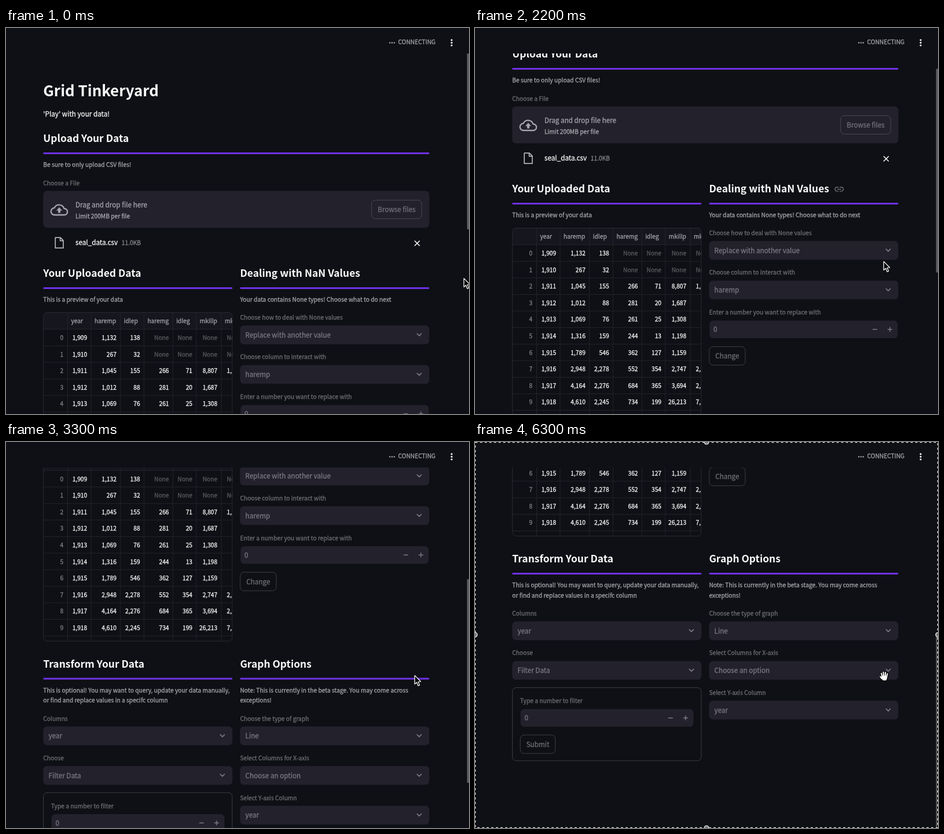
Recreate the animation shown at these times as an HTML page with a canvas. Size 800 by 667 pixels, loop 6.5 s.

```html
<!DOCTYPE html>
<html lang="en">
<head>
<meta charset="utf-8">
<title>Grid Tinkeryard</title>
<style>
html, body { margin: 0; width: 100%; height: 100%; overflow: hidden; background: #0e1015; }
canvas { display: block; width: 800px; height: 667px; }
</style>
</head>
<body>
<canvas id="stage"></canvas>
<script>
const W = 800, H = 667, LOOP = 6500, HEADER = 44;
const canvas = document.getElementById('stage');
const ctx = canvas.getContext('2d');
const dpr = window.devicePixelRatio || 1;
canvas.width = W * dpr;
canvas.height = H * dpr;

const FAMILY = '"Noto Sans CJK JP", "Noto Sans CJK SC", "Noto Sans CJK KR", "Noto Sans", sans-serif';
const SMALL = '10.24px ' + FAMILY;
const BODY = '11.7px ' + FAMILY;
const HEAD = 'bold 17.4px ' + FAMILY;
const TITLE = 'bold 25.9px ' + FAMILY;

const C = {
  bg: '#0e1015', box: '#23212c', accent: '#7031e6', white: '#fafafa',
  caption: '#a6a7aa', label: '#6e6f74', field: '#7b7983', soft: '#a5a4af',
  grid: '#23242b', edge: '#3d3e44', gridHead: '#16171e', none: '#5a5b61'
};
const LEFT = 64.3, MID = 404.4, COL = 327, FULL = 667.2, RADIUS = 6.5;

const COLUMNS = ['year', 'haremp', 'idlep', 'haremg', 'idleg', 'mkillp', 'mkillb'];
const EDGES = [106.5, 147, 197.7, 238.4, 288.3, 328.8, 372];
const ROWS = [
  '1,909 1,132 138 None None None None', '1,910 267 32 None None None None',
  '1,911 1,045 155 266 71 8,807 1,', '1,912 1,012 88 281 20 1,687',
  '1,913 1,069 76 261 25 1,308', '1,914 1,316 159 244 13 1,198',
  '1,915 1,789 546 362 127 1,159', '1,916 2,948 2,278 552 354 2,747 2,',
  '1,917 4,164 2,276 684 365 3,694 2,', '1,918 4,610 2,245 734 199 26,213 7,'
].map(row => row.split(' '));

// [time, scroll offset]
const SCROLL = [
  [1300, 0], [1400, 5], [1600, 54], [1800, 104], [2000, 118], [2100, 122],
  [2300, 170], [2500, 229], [2700, 252], [2800, 260], [3000, 362],
  [3200, 457], [3300, 471.5], [3500, 471.5], [3600, 482], [3800, 614],
  [3900, 655.3], [4000, 658], [4200, 655.5], [4500, 653]
];

function sample(keys, t) {
  if (t <= keys[0][0]) return keys[0][1];
  for (let i = 1; i < keys.length; i++) {
    const [t0, v0] = keys[i - 1], [t1, v1] = keys[i];
    if (t <= t1) return v0 + (v1 - v0) * (t - t0) / (t1 - t0);
  }
  return keys[keys.length - 1][1];
}

// A hairline around the regular weight gives the slightly heavy screen rendering.
function text(str, x, y, font, color, align = 'left') {
  ctx.font = font;
  ctx.fillStyle = ctx.strokeStyle = color;
  ctx.textAlign = align;
  ctx.fillText(str, x, y);
  if (font === SMALL || font === BODY) {
    ctx.lineWidth = 0.28;
    ctx.strokeText(str, x, y);
  }
}

function round(x, y, w, h, r = RADIUS) {
  ctx.beginPath();
  ctx.roundRect(x, y, w, h, r);
}

function fillBox(x, y, w, h, color, r) {
  round(x, y, w, h, r);
  ctx.fillStyle = color;
  ctx.fill();
}

function outline(x, y, w, h, color) {
  round(x, y, w, h);
  ctx.strokeStyle = color;
  ctx.lineWidth = 1;
  ctx.stroke();
}

function stroke(path, color, width) {
  ctx.strokeStyle = color;
  ctx.lineWidth = width;
  ctx.stroke(new Path2D(path));
}

function fill(path, color) {
  ctx.fillStyle = color;
  ctx.fill(new Path2D(path));
}

function dot(x, y, r, color) {
  ctx.beginPath();
  ctx.arc(x, y, r, 0, Math.PI * 2);
  ctx.fillStyle = color;
  ctx.fill();
}

function at(x, y, draw) {
  ctx.save();
  ctx.translate(x, y);
  draw();
  ctx.restore();
}

function heading(str, x, y, width) {
  text(str, x, y, HEAD, C.white);
  fillBox(x, y + 18, width, 3, C.accent, 1.4);
}

const caption = (str, x, y) => text(str, x, y, SMALL, C.caption);
const label = (str, x, y) => text(str, x, y, SMALL, C.label);

function select(name, value, x, y) {
  label(name, x, y - 10);
  fillBox(x, y, COL, 32.4, C.box);
  text(value, x + 9.2, y + 20.6, BODY, C.field);
  at(x + 309.6, y + 16, () => stroke('M-3.6-1.8L0 1.8L3.6-1.8', C.field, 1.7));
}

function numberInput(name, x, y, w) {
  label(name, x, y - 10.5);
  fillBox(x + 0.8, y, w - 0.8, 30.5, C.box);
  text('0', x + 7.6, y + 19.8, BODY, C.field);
  at(x + w - 39.5, y + 15.2, () => stroke('M-3.4 0H3.4', C.field, 1.5));
  at(x + w - 13.5, y + 15.2, () => stroke('M-3.5 0H3.5M0-3.5V3.5', C.field, 1.5));
}

function button(str, x, y, w, color, border) {
  outline(x, y, w, 32, border);
  text(str, x + w / 2, y + 20.8, BODY, color, 'center');
}

function linkIcon(x, y) {
  at(x, y, () => stroke('M-1.3-3.4H-3.8A3.4 3.4 0 0 0-3.8 3.4H-1.3' +
    'M1.3-3.4H3.8A3.4 3.4 0 0 1 3.8 3.4H1.3M-3 0H3', '#7f8085', 1.2));
}

function uploader() {
  fillBox(LEFT, 281.6, FULL, 63.6, C.box);
  at(92, 314, () => {
    stroke('M-8 9A6 6 0 0 1-8.4-3.2A9 9 0 0 1 8.3-2A5.4 5.4 0 0 1 9 9Z', C.soft, 2.3);
    fill('M0-4.2L5 1.4H2V5.4H-2V1.4H-5Z', C.soft);
  });
  text('Drag and drop file here', 120, 309.8, BODY, C.soft);
  text('Limit 200MB per file', 120, 329.2, SMALL, '#adacb4');
  button('Browse files', 631.7, 297.5, 86.6, '#74727c', '#494751');

  at(92, 371.2, () => stroke('M-6.8-9H2L7-4V9H-6.8ZM1.6-8.6V-3.6H6.6', '#b2b3b7', 1.7));
  text('seal_data.csv', 120, 374.8, BODY, C.white);
  text('11.0KB', 199.8, 375, SMALL, '#8a8b90');
  at(710.4, 372, () => stroke('M-4-4L4 4M4-4L-4 4', C.white, 1.6));
}

function table() {
  const top = 491.3, bottom = 816, first = 520.6, step = 28.6;
  ctx.save();
  round(LEFT, top, COL, bottom - top);
  ctx.clip();
  ctx.fillStyle = C.gridHead;
  ctx.fillRect(LEFT, top, COL, first - top);

  ctx.fillStyle = C.grid;
  EDGES.forEach(x => ctx.fillRect(x - 0.5, top, 1, bottom - top));
  for (let i = 0; i <= ROWS.length; i++) ctx.fillRect(LEFT, first + i * step - 0.5, COL, 1);

  COLUMNS.forEach((name, i) => text(name, EDGES[i] + 6, 510.2, SMALL, '#a2a3a8'));
  ROWS.forEach((row, r) => {
    const y = first + r * step + 18.4;
    text(r, 99.2, y, SMALL, '#818288', 'right');
    row.forEach((value, i) => {
      const color = value === 'None' ? C.none : C.white;
      if (i === 6) text(value, 381.6, y, SMALL, color);
      else text(value, EDGES[i + 1] - 6.8, y, SMALL, color, 'right');
    });
  });
  ctx.restore();
  outline(LEFT + 0.4, top + 0.4, COL - 0.8, bottom - top - 0.8, '#292a31');
}

function page(t) {
  text('Grid Tinkeryard', LEFT, 117.6, TITLE, C.white);
  text("'Play' with your data!", LEFT, 153, BODY, C.white);
  heading('Upload Your Data', LEFT, 197, FULL);
  caption('Be sure to only upload CSV files!', LEFT, 240.4);
  label('Choose a File', LEFT, 271.8);
  uploader();

  heading('Your Uploaded Data', LEFT, 430, COL);
  caption('This is a preview of your data', LEFT, 472.6);
  table();

  heading('Dealing with NaN Values', MID, 430, COL);
  if (t >= 400 && t < 2800) linkIcon(629.2, 424.6);
  caption('Your data contains None types! Choose what to do next', MID, 472.6);
  select('Choose how to deal with None values', 'Replace with another value', MID, 514);
  select('Choose column to interact with', 'haremp', MID, 582.4);
  numberInput('Enter a number you want to replace with', MID, 651.6, 326);
  button('Change', MID + 0.3, 696.6, 62.3, C.label, C.edge);

  heading('Transform Your Data', LEFT, 861, COL);
  caption('This is optional! You may want to query, update your data manually,', LEFT, 904);
  caption('or find and replace values in a specifc column', LEFT, 921.6);
  select('Columns', 'year', LEFT, 963);
  select('Choose', 'Filter Data', LEFT, 1031.4);
  outline(LEFT + 0.4, 1077.4, COL - 0.8, 126.4, C.edge);
  numberInput('Type a number to filter', 77.8, 1114.6, 299.6);
  button('Submit', 78.2, 1159.2, 60.6, C.label, C.edge);

  heading('Graph Options', MID, 861, COL);
  if (t >= 3600 && t < 4700) linkIcon(544, 856.2);
  caption('Note: This is currently in the beta stage. You may come across', MID, 904);
  caption('exceptions!', MID, 921.6);
  select('Choose the type of graph', 'Line', MID, 963);
  select('Select Columns for X-axis', 'Choose an option', MID, 1031.4);
  select('Select Y-axis Column', 'year', MID, 1100);
}

function toolbar() {
  [663.2, 667, 670.8].forEach(x => dot(x, 25.4, 1.25, '#a3a4a9'));
  text('CONNECTING', 677.6, 28.4, SMALL, '#a3a4a9');
  [20.8, 25.4, 30].forEach(y => dot(770, y, 1.6, C.white));
}

function arrow(x, y, scale = 1) {
  const shape = 'M.6.6V15.6L4 12.5L6.5 18.4L9 17.3L6.5 11.6L11 11.2Z';
  at(x, y, () => {
    ctx.scale(scale, scale);
    fill(shape, '#000');
    stroke(shape, '#fff', 1.25);
  });
}

function blocked() {
  arrow(705, 401.5, 0.95);
  at(715.6, 426.8, () => {
    const sign = 'M8 0A8 8 0 1 1-8 0A8 8 0 1 1 8 0M-5.6-5.6L5.6 5.6';
    dot(0, 0, 8, C.bg);
    stroke(sign, '#000', 4);
    stroke(sign, '#fff', 2.3);
  });
}

function hand() {
  const fingers = 'M-3.6 0L-4.8-4.6M-1-1L-1.4-6.6M1.8-1L2.2-6.2M4.3 1L5.4-3.8M-4 4.6L-6.8 1';
  const palm = 'M-4.6-.6H5.2V3L3.6 7.6H-2.2L-5 3.4Z';
  at(707, 404.4, () => {
    stroke(fingers, '#000', 4);
    stroke(palm, '#000', 2);
    stroke(fingers, '#fff', 2.1);
    fill(palm, '#fff');
  });
}

function selection() {
  ctx.save();
  ctx.lineCap = 'butt';
  ctx.lineWidth = 1.2;
  ctx.strokeStyle = '#000';
  ctx.strokeRect(0.6, 0.6, W - 1.2, H - 1.2);
  ctx.setLineDash([4, 4]);
  ctx.strokeStyle = '#e8e8e8';
  ctx.strokeRect(0.6, 0.6, W - 1.2, H - 1.2);
  ctx.restore();
  [[400, 0], [0, 333], [800, 333], [400, 667]].forEach(([x, y]) => {
    dot(x, y, 4.6, '#e6e6e6');
    dot(x, y, 3.2, '#77787b');
  });
}

function render(t) {
  ctx.setTransform(dpr, 0, 0, dpr, 0, 0);
  ctx.lineCap = ctx.lineJoin = 'round';
  ctx.fillStyle = C.bg;
  ctx.fillRect(0, 0, W, H);

  const scroll = sample(SCROLL, t);
  ctx.save();
  ctx.beginPath();
  ctx.rect(0, HEADER, W, H - HEADER);
  ctx.clip();
  at(0, -scroll, () => page(t));
  fillBox(796.6, -4 + scroll * 0.511, 6, 352, '#5d5e62', 1.5);
  ctx.restore();
  toolbar();

  if (t >= 6000) {
    selection();
    hand();
  } else if (t >= 4700) {
    blocked();
  } else {
    const u = Math.min(1, t / 500);
    const ease = 1 - (1 - u) ** 2;
    arrow(790.6 - 85 * ease, 432 - 29.2 * ease);
  }
}

// The picture advances in steps of 100 ms.
const start = performance.now();
function tick() {
  const t = (performance.now() - start) % LOOP;
  render(Math.floor(t / 100) * 100);
  requestAnimationFrame(tick);
}
tick();
</script>
</body>
</html>
```
